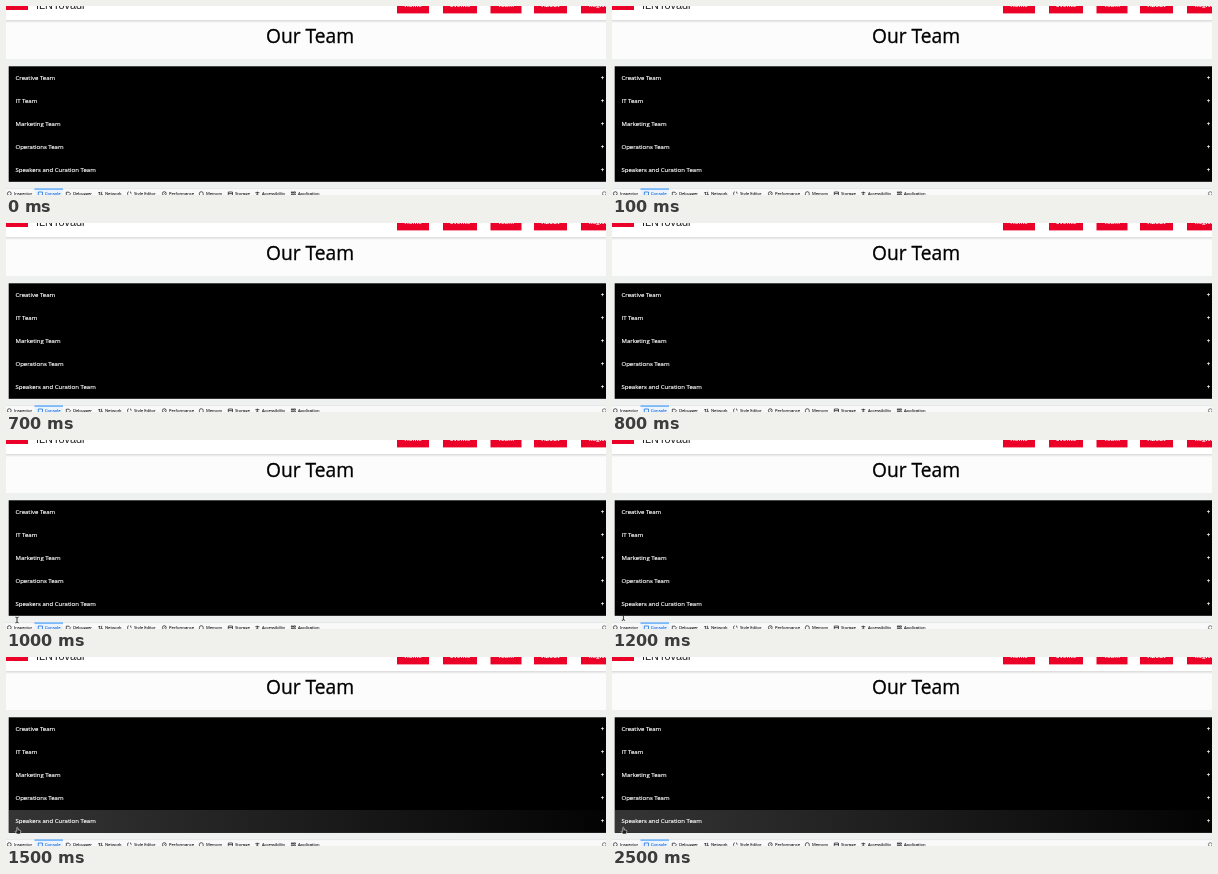
Recreate the animation shown at these times as an HTML page. Size 600x189 px, loop 8000 ms.

```html
<!DOCTYPE html>
<html lang="en">
<head>
<meta charset="utf-8">
<title>Our Team</title>
<style>
  html, body { margin: 0; width: 100%; height: 100%; overflow: hidden; background: #fff; }
  svg { display: block; width: 600px; height: 189px; font-family: "Open Sans", "Noto Sans", sans-serif; }
</style>
</head>
<body>
<svg id="stage" viewBox="0 0 600 189">
  <defs>
    <linearGradient id="hoverFill">
      <stop offset="0" stop-color="#353535"/>
      <stop offset="1" stop-color="#030303"/>
    </linearGradient>
    <linearGradient id="shade" x2="0" y2="1">
      <stop offset="0" stop-color="#d8d8da"/>
      <stop offset="1" stop-color="#fdfcfd"/>
    </linearGradient>
  </defs>
  <rect width="600" height="189" fill="#fdfcfd"/>
  <rect width="600" height="14" fill="#fff"/>
  <rect y="14" width="600" height="3" fill="url(#shade)"/>
  <rect y="53" width="600" height="130" fill="#eff0f0"/>
  <rect x="2.7" y="60.3" width="597.3" height="115.5" fill="#000"/>
  <rect id="hover" x="3" y="153" width="597" height="22.4" fill="url(#hoverFill)"/>
  <rect y="183" width="600" height="6" fill="#f9f9fa"/>
  <rect y="182.6" width="600" height=".5" fill="#dcdce0"/>
  <g id="page"></g>
  <path id="beam" d="M-1.2-2.8Q0-2.8 0-2.2V2.2Q0 2.8-1.2 2.8M1.2-2.8Q0-2.8 0-2.2M0 2.2Q0 2.8 1.2 2.8"
    fill="none" stroke="#222" stroke-width=".9" stroke-linecap="round"/>
  <path id="hand" d="M-1.2-3.2Q-.5-3.8 0-3V-1L2.2-.5Q3-.2 2.8.8L2.2 3.2H-1.2L-2.8.8Q-2.6-.2-1.2.6Z"
    fill="#1c1c1c" stroke="#e2e2e2" stroke-width=".65" stroke-linejoin="round"/>
</svg>
<script>
  const NS = "http://www.w3.org/2000/svg";
  const LOOP = 8000;
  const RED = "#eb0028";
  const $ = id => document.getElementById(id);
  const page = $("page");

  function add(tag, attrs, text) {
    const el = document.createElementNS(NS, tag);
    for (const key in attrs) el.setAttribute(key, attrs[key]);
    if (text) el.textContent = text;
    page.appendChild(el);
    return el;
  }
  const label = (text, x, y, size, fill, extra) =>
    add("text", { x, y, "font-size": size, fill, ...extra }, text);
  const box = (x, y, width, height, fill) => add("rect", { x, y, width, height, fill });
  // A thin outline gives regular type a slightly heavier weight
  const heavier = (stroke, width) => ({ stroke, "stroke-width": width });

  // Header and navigation
  box(0, -18, 22, 22, RED);
  label("ILNTovadi", 30, 3.4, 10.9, "#222", { "font-family": "Liberation Sans, sans-serif" });
  [["Home", 391, 32], ["Events", 437, 34], ["Team", 484.5, 31],
   ["About", 528, 33], ["Register", 575, 40]].forEach(([text, x, w]) => {
    box(x, -8, w, 15.4, RED);
    label(text, x + w / 2, 1.2, 6, "#fff", { "font-weight": 700, "text-anchor": "middle" });
  });

  label("Our Team", 304, 37.4, 19.2, "#000", { "text-anchor": "middle", ...heavier("#000", .3) });

  // Accordion rows
  ["Creative Team", "IT Team", "Marketing Team", "Operations Team",
   "Speakers and Curation Team"].forEach((text, i) => {
    const y = 74 + i * 23.1;
    label(text, 9.5, y, 6.02, "#fff", heavier("#fff", .16));
    label("+", 596.5, y, 6, "#fff", { "text-anchor": "middle", ...heavier("#fff", .25) });
  });

  // Tool tabs, cut off by the lower edge
  const ring = "M.4 2.2A1.9 1.9 0 1 1 4.2 2.2A1.9 1.9 0 1 1 .4 2.2";
  const frame = "M.3.6H4.5V4H.3Z";
  const tabs = [
    ["Inspector", 8, ring],
    ["Console", 39, frame],
    ["Debugger", 67, "M.3.8H3L4.6 2.4L3 4H.3Z"],
    ["Network", 99, "M1.4 4V.6L.3 1.7M1.4.6L2.4 1.7M3.6.4V4L2.6 3M3.6 4L4.6 3"],
    ["Style Editor", 128, "M1.6.3Q.7.3.8 1.5Q.8 2.2.2 2.3Q.8 2.4.8 3.4M3 .3Q3.9.3 3.8 1.5Q3.8 2.2 4.4 2.3"],
    ["Performance", 163, ring + "M2.3 2.3L3.3 1.2"],
    ["Memory", 200, "M.4 3.6V2A1.9 1.7 0 0 1 4.2 2V3.6"],
    ["Storage", 229, frame + "M.3 2.2H4.5"],
    ["Accessibility", 256, "M.3 1.3H4.4M2.3.2V2.4L1 4.4M2.3 2.4L3.6 4.4"],
    ["Application", 292, "M.4.5H1.6V1.7H.4ZM2.5.5H4.4V1.7H2.5ZM.4 2.8H1.6V4H.4ZM2.5 2.8H4.4V4H2.5Z"]
  ];
  box(28.5, 183, 28.5, 6, "#edf3fb");
  box(28.5, 182.6, 28.5, .9, "#0a84ff");
  tabs.forEach(([text, x, d]) => {
    const color = text === "Console" ? "#0060df" : "#18181b";
    add("path", { d, transform: `translate(${x - 7} 185.4)`, fill: "none", ...heavier(color, .7) });
    label(text, x, 188.9, 4.15, color, heavier(color, .08));
  });
  add("path", { d: ring, transform: "translate(596 185.4)", fill: "none", ...heavier("#333", .6) });

  const show = (id, on) => { $(id).style.display = on ? "" : "none"; };

  // The pointer rises in 100 ms steps and turns into a hand over the last row
  function draw(t) {
    const step = Math.min(5, Math.floor((t - 1000) / 100));
    const onRow = step >= 3;
    const pos = `translate(${11 + step * .2} ${180 - step * 1.25})`;
    $("beam").setAttribute("transform", pos);
    $("hand").setAttribute("transform", pos);
    show("beam", step >= 0 && !onRow);
    show("hand", onRow);
    show("hover", t >= 1500);
  }

  const start = performance.now();
  function tick() {
    draw((performance.now() - start) % LOOP);
    requestAnimationFrame(tick);
  }
  tick();
</script>
</body>
</html>
```
